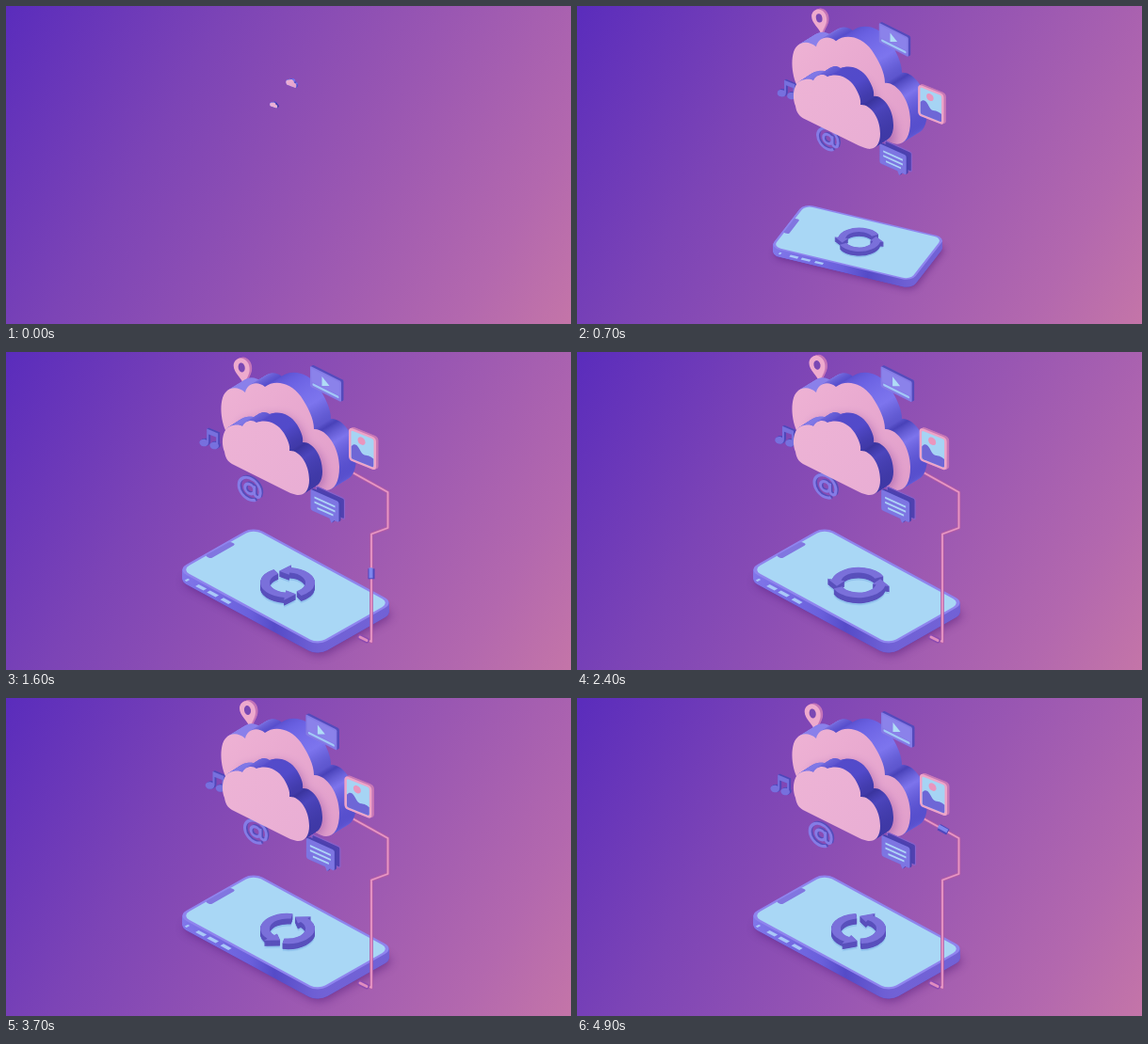
An HTML page with a canvas for the animation above (5000 ms loop, 600 by 338 pixels).

```html
<!DOCTYPE html>
<html lang="en">
<head>
<meta charset="utf-8">
<title>Cloud sync</title>
<style>
html, body { margin: 0; width: 100%; height: 100%; overflow: hidden; }
body { background: linear-gradient(120deg, #5a2cbc 0%, #7c44b6 30%, #9a57b2 60%, #b368ae 85%, #c475a8 100%); }
canvas { display: block; width: 100%; height: 100%; }
</style>
</head>
<body>
<canvas id="stage" width="600" height="338"></canvas>
<script>
const ctx = document.getElementById('stage').getContext('2d');
const LOOP = 5000, STEP = 100, TILT = 0.556, RAD = Math.PI / 180;

const clamp = v => Math.max(0, Math.min(1, v));
const easeOut = v => 1 - (1 - clamp(v)) ** 3;
const mix = (a, b, k) => a + (b - a) * k;

function group(draw) {
  ctx.save();
  draw();
  ctx.restore();
}

function gradient(x0, y0, x1, y1, ...stops) {
  const g = ctx.createLinearGradient(x0, y0, x1, y1);
  stops.forEach(([at, color]) => g.addColorStop(at, color));
  return g;
}

function fill(path, color) {
  ctx.fillStyle = color;
  ctx.fill(path);
}

function stroke(path, color, width) {
  ctx.strokeStyle = color;
  ctx.lineWidth = width;
  ctx.stroke(path);
}

function rounded(x, y, w, h, r) {
  const p = new Path2D();
  p.roundRect(x, y, w, h, r);
  return p;
}

// Solid body: copies of the face laid from the far end to the near one.
function extrude(path, dx, dy, color, n = 20) {
  for (let i = n; i > 0; i--) group(() => {
    ctx.translate(dx * i / n, dy * i / n);
    fill(path, color);
  });
}

/* ---- clouds ---- */

const back = {
  x: 300, y: 84, x0: 304, y0: 82, dx: 18, dy: -11,
  path: new Path2D('M236 88C228 78 225 50 234 42C239 37 247 37 254 43C256 33 267 30 275 37' +
    'C285 29 302 32 313 47C321 59 327 71 327 82C340 81 354 101 354 122C354 138 349 147 340 147' +
    'C333 147 325 140 318 136L242 98Z'),
  side: gradient(250, 60, 372, 80, [0, '#8a80ea'], [0.16, '#574ecc'], [0.35, '#6a61e2'],
    [0.55, '#7d75ee'], [0.7, '#4841b8'], [0.82, '#7d74ec'], [0.93, '#5149c8'], [1, '#453db6']),
  face: gradient(230, 40, 350, 140, [0, '#eeb2d4'], [1, '#e29fcb'])
};

const front = {
  x: 283, y: 108, x0: 285, y0: 105, dx: 14, dy: -9,
  path: new Path2D('M232 106C228 96 230 82 238 79C243 77 248 77 251 79C254 73 261 71 266 75' +
    'C276 71 288 75 295 86C299 93 302 99 301 105C311 104 322 118 322 136C322 147 317 153 309 152' +
    'C304 151 300 149 296 147L240 119C235 116 233 112 232 106Z'),
  side: gradient(244, 85, 335, 110, [0, '#8078e6'], [0.25, '#544bca'], [0.5, '#524aca'],
    [0.68, '#3a349e'], [0.8, '#4c45bc'], [1, '#3a349e']),
  face: gradient(232, 80, 318, 150, [0, '#edb3d5'], [1, '#e9aed4'])
};

function place(c, s, turn) {
  ctx.translate(mix(c.x0, c.x, s), mix(c.y0, c.y, s));
  ctx.scale(s, s);
  ctx.transform(1, -0.1 * turn, 0, 1 - 0.07 * turn, 0, 0);
  ctx.translate(-c.x, -c.y);
}

function drawCloud(c) {
  extrude(c.path, c.dx, c.dy, c.side);
  fill(c.path, c.face);
}

function drawClouds(t) {
  const s = easeOut((t + 15) / 500);
  const turn = 1 - easeOut((t - 400) / 450);
  group(() => {
    place(back, s, turn);
    drawCloud(back);
    // Only the cast shadow shows: the caster itself stands off stage.
    ctx.clip(back.path);
    ctx.shadowColor = 'rgba(120,50,150,.5)';
    ctx.shadowBlur = 12 * s;
    ctx.shadowOffsetX = 1000 + 16 * s;
    ctx.shadowOffsetY = -5 * s;
    ctx.translate(-1000 / s, 100 / s * turn);
    fill(front.path, '#000');
  });
  group(() => {
    place(front, s, turn);
    drawCloud(front);
  });
}

/* ---- phone ---- */

const body = rounded(-104.5, -58, 209, 116, 14);
const glass = rounded(-101, -54.5, 202, 109, 11);
const notch = rounded(-102, -20, 8, 38, 3);
const buttons = new Path2D('M-91 58h3M-75 58h12M-58 58h13M-38 58h12');

function ground(angle, z, draw) {
  group(() => {
    const c = Math.cos(angle), s = Math.sin(angle);
    ctx.translate(0, z);
    ctx.transform(c, TILT * s, -s, TILT * c, 0, 0);
    draw();
  });
}

const arrow = new Path2D();
arrow.arc(0, 0, 29, 0.22, 2.72);
arrow.arc(0, 0, 19, 2.72, 0.22, true);
[[15, 0.22], [24, -0.28], [34, 0.22]].forEach(([r, a]) =>
  arrow.lineTo(r * Math.cos(a), r * Math.sin(a)));
arrow.closePath();

const spin = [[0, 72], [1000, -33], [2400, -180], [3200, -355], [4300, -487], [5000, -632]];

function spinAt(t) {
  const i = spin.findIndex(([time]) => t < time);
  const [t0, a0] = spin[i - 1], [t1, a1] = spin[i];
  return mix(a0, a1, (t - t0) / (t1 - t0)) * RAD;
}

function drawSync(t) {
  const ring = (z, color) => group(() => {
    ctx.translate(2, z - 4);
    ctx.scale(1, TILT);
    ctx.rotate(spinAt(t));
    fill(arrow, color);
    ctx.rotate(Math.PI);
    fill(arrow, color);
  });
  ring(8, 'rgba(110,165,225,.4)');
  for (let z = 6; z > 0; z -= 0.5) ring(z, '#5950bc');
  ring(0, '#7a70da');
}

function drawPhone(t) {
  const s = easeOut((t - 320) / 950);
  if (!s) return;
  const angle = (44.3 - 97 * (1 - s)) * RAD;
  group(() => {
    ctx.translate(mix(302, 297, s), mix(260, 249, s));
    ctx.scale(s, s);
    const side = gradient(-100, 0, 105, 0, [0, '#8177ea'], [0.5, '#6a60dc'], [0.68, '#554bc8'], [1, '#7262d6']);
    ground(angle, 10, () => {
      ctx.shadowColor = 'rgba(70,15,110,.45)';
      ctx.shadowBlur = 10 * s;
      ctx.shadowOffsetX = 2 * s;
      ctx.shadowOffsetY = 3 * s;
      fill(body, '#554bc8');
    });
    for (let z = 10; z > 0; z -= 0.5) ground(angle, z, () => fill(body, side));
    ground(angle, 5, () => stroke(buttons, '#a9c8f8', 5));
    ground(angle, 0, () => {
      fill(body, '#8f84ee');
      fill(glass, '#a9d7f5');
      fill(notch, '#8176e0');
    });
    drawSync(t);
  });
}

/* ---- cable ---- */

const cable = new Path2D('M366 127L405.5 149V187L388 193.5V308L376 302');
const CABLE = 229;

function drawCable(t) {
  const grown = clamp((t - 850) / 700);
  if (!grown) return;
  group(() => {
    ctx.lineJoin = 'round';
    ctx.setLineDash([CABLE * grown, 999]);
    stroke(cable, '#b25ca6', 3.6);
    stroke(cable, '#e897c4', 1.8);
    if (grown < 1) return;
    ctx.setLineDash([]);
    ctx.lineCap = 'round';
    const plug = new Path2D('M376 303L383 306.5');
    stroke(plug, '#8d4bb0', 6);
    stroke(plug, '#e08cc0', 3);
    const at = 211 - 0.32 * ((t - 1374) % 1466);
    if (at < 2) return;
    ctx.lineCap = 'butt';
    ctx.setLineDash([11, 999]);
    ctx.lineDashOffset = -at;
    stroke(cable, '#4d47bd', 7);
    ctx.translate(-0.5, -1);
    stroke(cable, '#7f86ee', 4);
  });
}

/* ---- icons ---- */

const pinShape = new Path2D('M2 16C0 8 -9 3 -9 -5C-9 -10 -5 -13 -1 -13C5 -12 8 -7 8 -1C8 5 4 9 2 16Z');
const pinHole = new Path2D();
pinHole.ellipse(-0.5, -3, 3.5, 5, -0.2, 0, 7);

const notes = new Path2D('M-3 -9L9 -4V8H7V0L-1 -3V6H-3Z');
notes.ellipse(-6, 6, 4.8, 3.8, 0.2, 0, 7);
notes.moveTo(9, 9);
notes.ellipse(5, 9, 4.8, 3.8, 0.2, 0, 7);

const atSign = new Path2D();
atSign.arc(0, 0, 5, 0, 7);
atSign.moveTo(5, -5);
atSign.lineTo(5, 3);
atSign.arc(8, 3, 3, Math.PI, 0, true);
atSign.lineTo(11.5, 0);
atSign.arc(0, 0, 11.5, 0, 1, true);

const bubble = new Path2D('M-13 -11H13Q15 -11 15 -9V9Q15 11 13 11H10L7 15L5 11H-13Q-15 11 -15 9V-9Q-15 -11 -13 -11Z');
const frame = rounded(-14.5, -17.5, 29, 35, 4);
const picture = rounded(-12, -15, 24, 30, 2);
const screen = rounded(-16.5, -11, 33, 22, 1.5);

function slant(k) {
  ctx.transform(1, k, 0, 1, 0, 0);
}

function drawPin() {
  extrude(pinShape, 2.5, -1, '#c474b8', 5);
  fill(pinShape, '#eeaacd');
  fill(pinHole, '#7a48b4');
}

function drawNotes() {
  extrude(notes, 2, -1, '#5048ba', 4);
  fill(notes, '#7770de');
}

function drawAt() {
  slant(0.35);
  group(() => {
    ctx.translate(1.5, -1.5);
    stroke(atSign, '#554cba', 3);
  });
  stroke(atSign, '#857ce6', 3);
}

function drawChat() {
  slant(0.45);
  group(() => {
    ctx.translate(6, -6);
    fill(bubble, '#4f41b0');
    stroke(bubble, '#8a62cc', 1.2);
  });
  extrude(bubble, 2, -2, '#4a42b0', 4);
  fill(bubble, '#7d75e2');
  stroke(new Path2D('M-11 -4H11M-11 1H11M-8 6H9'), '#aed4f7', 2);
}

function drawImage() {
  slant(0.4);
  extrude(frame, 2.5, -2, '#c878b6', 5);
  fill(frame, '#eea4c8');
  fill(picture, '#a6d4f4');
  ctx.clip(picture);
  fill(new Path2D('M-12 2C-8 -4 -5 -2 -2 3C2 9 5 2 12 6V16H-12Z'), '#6e67d6');
  const sun = new Path2D();
  sun.arc(-1, -8, 4, 0, 7);
  fill(sun, '#ea96be');
}

function drawVideo() {
  slant(0.5);
  extrude(screen, 2.5, -2.5, '#544bbc', 5);
  fill(screen, '#857be6');
  fill(rounded(-15, -9, 30, 14, 1), '#8b82ea');
  fill(rounded(-14, 6, 28, 2.5, 1), '#a2c8f6');
  fill(new Path2D('M-4 -6L4 0L-4 4Z'), '#b0dcf6');
}

// Rest place, place it grows from, drawing, and the time of its sway.
const LEFT = 5000, RIGHT = 3350;
const icons = [
  [257, 16, 272, 8, drawPin, LEFT],
  [222.5, 87, 234, 87, drawNotes, LEFT],
  [265, 142, 292, 129, drawAt, LEFT],
  [338.5, 163.5, 318, 135, drawChat, RIGHT],
  [378.5, 103, 363, 119, drawImage, RIGHT],
  [339.5, 34, 315, 52, drawVideo, RIGHT]
];

function drawIcons(t, list) {
  const q = easeOut((t - 300) / 650);
  if (!q) return;
  list.forEach(([x, y, x0, y0, draw, peak]) => group(() => {
    const d = 6.5 * q * Math.cos(Math.PI * (t - peak) / 3300) ** 6;
    ctx.translate(mix(x0, x, q) - d, mix(y0, y, q) + 0.55 * d);
    ctx.scale(q, q);
    draw();
  }));
}

function render(now) {
  const t = Math.floor(now % LOOP / STEP) * STEP;
  const behind = t < 600 ? 6 : 3;
  ctx.clearRect(0, 0, 600, 338);
  drawPhone(t);
  drawCable(t);
  drawIcons(t, icons.slice(0, behind));
  drawClouds(t);
  drawIcons(t, icons.slice(behind));
}

const start = performance.now();
function tick() {
  render(performance.now() - start);
  requestAnimationFrame(tick);
}
tick();
</script>
</body>
</html>
```
